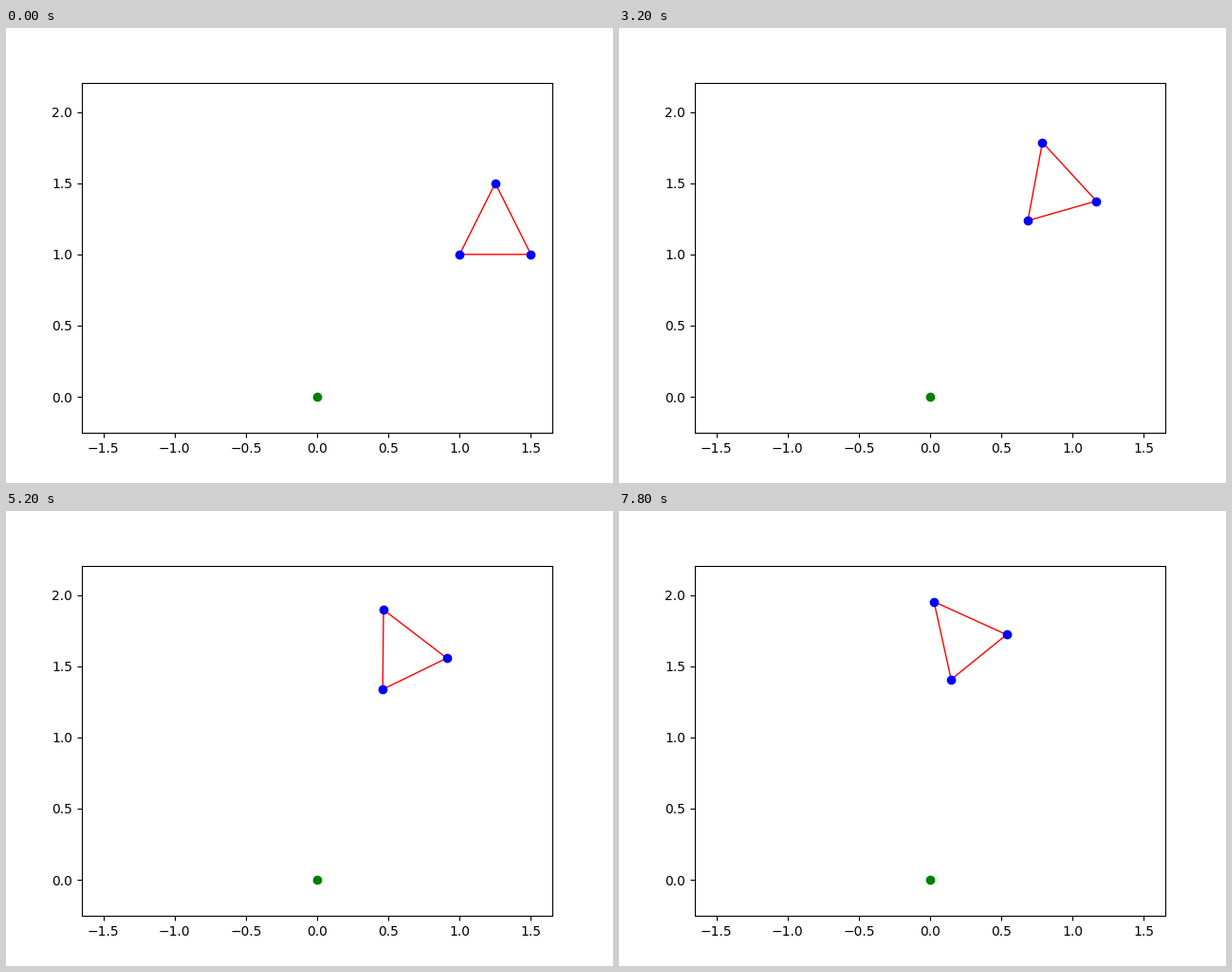
Recreate the animation shown at these times as a matplotlib script. Size 640 by 480 pixels, loop 8000 ms.

```python
import numpy as np
import matplotlib.pyplot as plt
from matplotlib.animation import FuncAnimation
from matplotlib.patches import Polygon

FRAMES = 40
INTERVAL = 200
STEP = np.radians(1)

TRIANGLE = np.array([[1, 1], [1.5, 1], [1.25, 1.5]])


def rotate(points, angle):
    c, s = np.cos(angle), np.sin(angle)
    return points @ np.array([[c, s], [-s, c]])


fig, ax = plt.subplots(figsize=(6.4, 4.8), dpi=100)

# Equal scale on both axes, centred on the full swing of the triangle.
box = ax.get_window_extent()
half_w = 1.65
half_h = half_w * box.height / box.width
mid_y = np.hypot(1.25, 1.5) / 2
ax.set_xlim(-half_w, half_w)
ax.set_ylim(mid_y - half_h, mid_y + half_h)
ax.set_xticks(np.arange(-1.5, 1.6, 0.5))
ax.set_yticks(np.arange(0, 2.1, 0.5))

ax.plot(0, 0, "go")
outline = ax.add_patch(Polygon(TRIANGLE, closed=True, fill=False, edgecolor="red", linewidth=1))
corners, = ax.plot([], [], "bo")


def update(i):
    points = rotate(TRIANGLE, i * STEP)
    outline.set_xy(points)
    corners.set_data(points[:, 0], points[:, 1])
    return outline, corners


anim = FuncAnimation(fig, update, frames=FRAMES, interval=INTERVAL,
                     init_func=lambda: update(0), repeat=True, repeat_delay=0)
plt.show()
```
